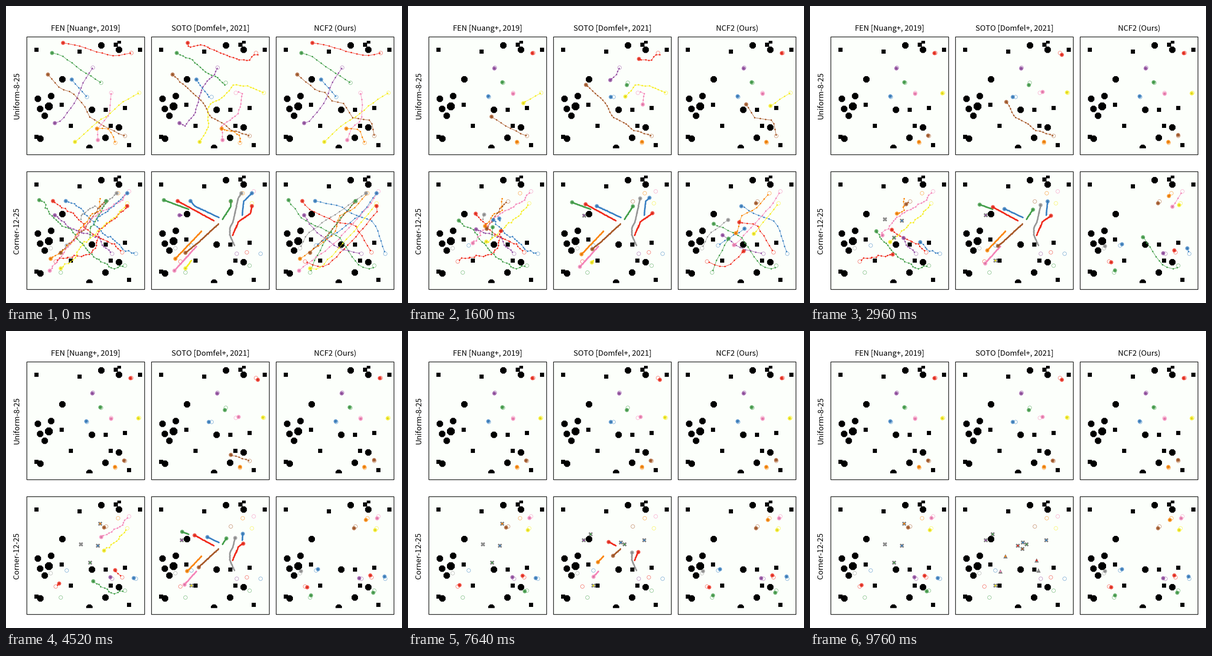
A matplotlib script that plays this animation: 864 by 648 pixels, repeating every 9.92 s.

```python
import math

import matplotlib.pyplot as plt
import numpy as np
from matplotlib.animation import FuncAnimation
from matplotlib.collections import LineCollection, PolyCollection
from matplotlib.colors import to_rgba
from matplotlib.patches import Rectangle

W, H = 864, 648
TICK, FRAMES = 40, 248
STEP_MS, STEPS = 97.55, 100
COL_DX, ROW_DY, SIDE = 272, 294, 257

COLORS = dict(red="#f02c1e", green="#45a04c", blue="#3c82c4", purple="#9650a4",
              orange="#fb8506", yellow="#f7ee22", brown="#a85a2a", pink="#f584b8",
              gray="#989898")
GRAY = to_rgba("#808080")

# Start and goal of each agent; a trailing 2 marks the second one of a colour.
UNIFORM = dict(
    red=((124, 80), (273, 102)), green=((100, 102), (207, 167)),
    brown=((91, 149), (259, 283)), blue=((143, 160), (176, 198)),
    purple=((106, 255), (189, 134)), pink=((200, 292), (229, 189)),
    orange=((198, 267), (238, 298)), yellow=((150, 296), (290, 189)))
CORNER = dict(
    green=((72, 423), (259, 566)), red=((102, 425), (253, 537)),
    blue=((130, 425), (283, 540)), purple=((106, 456), (231, 540)),
    gray=((241, 408), (97, 528)), blue2=((264, 408), (132, 522)),
    green2=((218, 425), (119, 581)), red2=((264, 436), (108, 557)),
    orange=((97, 551), (244, 408)), brown=((119, 538), (218, 426)),
    pink=((95, 577), (268, 404)), yellow=((119, 572), (264, 430)))

rng = np.random.default_rng(4)
agents, goal_pts, goal_colors = [], [], []


class Agent:
    """Walks along key points; a key with a third value is reached at that step."""

    def __init__(self, color, keys, pace, gap, jitter, dx):
        self.color = to_rgba(color)
        xy = np.array([p[:2] for p in keys], float) + (dx, 0)
        dist = np.r_[0, np.cumsum(np.hypot(*np.diff(xy, axis=0).T))]
        pins = [(0, 0)] + [(p[2], d) for p, d in zip(keys, dist) if len(p) == 3]
        if pins[-1][1] < dist[-1]:
            step, d = pins[-1]
            pins.append((step + (dist[-1] - d) / pace, dist[-1]))
        self.arrival = math.ceil(pins[-1][0])
        self.travel = np.interp(np.arange(STEPS + 1), *zip(*pins))
        count = max(2, round(dist[-1] / gap) + 1)
        self.s = np.linspace(0, dist[-1], count)
        self.nodes = np.c_[np.interp(self.s, dist, xy[:, 0]), np.interp(self.s, dist, xy[:, 1])]
        self.nodes[1:-1] += rng.normal(0, jitter, (count - 2, 2))
        self.end = "disc"

    def pose(self, k):
        here = [np.interp(self.travel[k], self.s, axis) for axis in self.nodes.T]
        return here, self.nodes[self.s > self.travel[k] + 1e-6]


def short_of(goal, before, gap):
    way = np.subtract(goal, before[:2])
    return tuple(goal - way * gap / np.hypot(*way))


def panel(scene, col, pace, gap, jitter, short, via, stops=None):
    stops = stops or {}
    for name, (start, goal) in scene.items():
        color = COLORS[name.rstrip("2")]
        keys = [start, *via.get(name, ())]
        stop = stops.get(name) or short_of(goal, keys[-1], short)
        agent = Agent(color, keys + [stop], pace, gap, jitter, col * COL_DX)
        if math.dist(stop[:2], goal) > 20:
            agent.end = "triangle" if agent.arrival >= STEPS else "cross"
        agents.append(agent)
        goal_pts.append((goal[0] + col * COL_DX, goal[1]))
        goal_colors.append(to_rgba(color, 0.85))


direct = dict(
    red=[(158, 86), (197, 99), (241, 109)],
    green=[(117, 106), (171, 144)],
    brown=[(118, 180), (145, 189), (172, 218), (181, 241, 16), (225, 268)],
    purple=[(118, 251), (152, 209), (166, 169)],
    pink=[(198, 270), (225, 236)],
    orange=[(226, 268)],
    yellow=[(192, 258), (222, 238), (251, 211, 16)])
panel(UNIFORM, 0, 10.5, 12.5, 0.5, 2, direct)

panel(UNIFORM, 1, 10, 7.5, 0.7, 2, dict(
    red=[(125, 90), (155, 84), (188, 99), (231, 115, 16), (259, 119), (266, 107)],
    green=[(133, 118), (173, 150), (185, 152)],
    brown=[(115, 172, 16), (156, 208, 30), (172, 240), (210, 262), (218, 270, 46)],
    purple=[(118, 262), (140, 233), (155, 180), (168, 161, 16), (183, 149)],
    pink=[(198, 260), (233, 236), (240, 214, 16), (243, 192)],
    orange=[(225, 275), (239, 283)],
    yellow=[(168, 270), (169, 216), (203, 197, 16), (225, 171), (262, 176)]),
    dict(red=(277, 106), green=(205, 172), blue=(170, 198), pink=(235, 187)))

panel(UNIFORM, 2, 10.5, 12.5, 0.5, 2, {
    **direct,
    "brown": [(134, 185), (150, 186), (165, 206), (194, 213, 16), (211, 243), (253, 249)],
    "pink": [(210, 263), (231, 250), (233, 215)],
    "yellow": [(187, 260), (227, 236), (246, 217, 16)]})

panel(CORNER, 0, 4.5, 6.5, 1.1, 5, dict(
    green=[(88, 429), (85, 440), (110, 468, 16), (143, 491, 30), (168, 520), (190, 546, 46), (235, 573)],
    red=[(118, 437), (147, 452, 16), (178, 491, 30), (238, 522, 46)],
    blue=[(152, 432), (187, 467, 16), (215, 500), (242, 513, 30), (253, 531)],
    purple=[(147, 488, 16), (206, 505, 30), (209, 520)],
    gray=[(207, 440), (192, 436), (165, 454, 16)],
    blue2=[(225, 445), (198, 463, 16)],
    green2=[(208, 450), (185, 482, 16)],
    red2=[(238, 462), (201, 489, 16), (198, 525), (180, 542, 30), (116, 551, 46)],
    orange=[(140, 520), (167, 479, 16), (189, 452, 30), (206, 446)],
    brown=[(172, 484, 16), (208, 431, 30)],
    pink=[(141, 518, 16), (157, 500, 30), (188, 460), (208, 448, 46), (240, 432)],
    yellow=[(148, 553), (169, 514, 16), (174, 514, 30), (214, 479, 46), (245, 455)]),
    dict(gray=(163, 465, 19), blue2=(200, 468, 18), green2=(183, 505, 26), orange=(205, 420, 39)))

panel(CORNER, 1, 1, 1.2, 0.3, 5, dict(
    blue=[(139, 436, 16)],
    gray=[(234, 419, 16), (223, 470, 64), (216, 483, 78), (216, 500)],
    blue2=[(246, 426, 30)],
    green2=[(218, 437, 16)],
    red2=[(261, 452, 16), (235, 470, 64)],
    brown=[(148, 515, 46)]),
    dict(green=(126, 443, 63), red=(181, 468, 97), blue=(192, 461, 74), purple=(111, 456, 8),
         gray=(226, 522, 100), blue2=(243, 456, 60), green2=(200, 465, 72), red2=(222, 500, 100),
         orange=(154, 491, 100), brown=(191, 475, 97), pink=(143, 524, 100), yellow=(132, 555, 22)))

panel(CORNER, 2, 8, 12, 0.7, 5, dict(
    green=[(98, 461), (122, 474, 16), (183, 503, 30), (218, 558), (231, 570), (255, 574)],
    red=[(111, 440), (178, 472, 16), (216, 477)],
    blue=[(183, 436, 16), (221, 458), (258, 470), (279, 528, 30)],
    purple=[(124, 485), (141, 500, 16), (186, 530)],
    gray=[(155, 467, 16), (112, 497)],
    blue2=[(226, 458), (189, 486, 16)],
    green2=[(184, 465), (154, 507, 16), (134, 545)],
    red2=[(267, 445), (231, 490), (188, 535, 16), (156, 566), (136, 567)],
    orange=[(134, 525), (172, 496, 16), (184, 456), (213, 443)],
    brown=[(156, 500), (194, 455, 11)],
    pink=[(136, 545), (168, 522, 16), (246, 437, 30)],
    yellow=[(136, 575), (171, 540), (210, 496, 16)]))


def box(x, y, w=9, h=9):
    return np.array([(x + i * w / 2, y + j * h / 2) for i, j in [(-1, -1), (1, -1), (1, 1), (-1, 1)]])


def octagon(x, y, r=7.0):
    turn = np.pi / 8 + np.arange(8) * np.pi / 4
    return np.c_[x + r * np.cos(turn) * 1.08, y + r * np.sin(turn) * 1.08]


BOXES = [(66, 95), (159.5, 98.5), (239, 84), (292, 95), (121, 215), (259, 222),
         (216.5, 226), (141, 261), (228, 261), (268, 303), (66, 285)]
BLOBS = [(207.5, 85.5), (246, 95), (122.5, 159.5), (98, 196), (69, 202), (74, 224),
         (84, 239), (187, 226), (246, 264.5), (216.5, 287), (74.5, 289)]
cut_blob = np.minimum(octagon(181.5, 309), (W, 310))
obstacles = [box(*p) for p in BOXES] + [octagon(*p) for p in BLOBS]
obstacles += [box(246, 78, 8, 6), octagon(93, 218.5, 8.5), cut_blob]

plt.rcParams["font.family"] = "Noto Sans CJK JP"
fig = plt.figure(figsize=(W / 72, H / 72), dpi=72, facecolor="white")
ax = fig.add_axes([0, 0, 1, 1])
# Whole numbers fall on pixel centres.
ax.set(xlim=(-0.5, W - 0.5), ylim=(H - 0.5, -0.5))
ax.axis("off")

shapes = []
for row in range(2):
    for col in range(3):
        shift = np.array((col * COL_DX, row * ROW_DY))
        ax.add_patch(Rectangle(shift + (45, 67), SIDE, SIDE, fc="#fcfffb", ec="black", lw=1.3, snap=False))
        shapes += [s + shift for s in obstacles]
ax.add_collection(PolyCollection(shapes, facecolors="black", linewidths=0, zorder=2))

for x, y, title in [(173.5, 54, "FEN [Nuang+, 2019]"), (445.5, 53, "SOTO [Domfel+, 2021]"),
                    (717.5, 53, "NCF2 (Ours)")]:
    ax.text(x, y, title, size=16.6, ha="center", va="baseline")
for y, label in [(195.5, "Uniform-8-25"), (489.5, "Corner-12-25")]:
    ax.text(27.5, y, label, size=16.6, rotation=90, rotation_mode="anchor", ha="center", va="baseline")

ax.scatter(*np.array(goal_pts).T, s=64, facecolors="none", edgecolors=goal_colors, linewidths=0.7, zorder=3)


def markers(diameter, shape, z):
    return ax.scatter([], [], s=diameter ** 2, marker=shape, linewidths=0, zorder=z)


lines = LineCollection([], linewidths=0.9, zorder=4)
ax.add_collection(lines)
dots = markers(3.3, "o", 5)
ends = dict(disc=markers(8.8, "o", 6), cross=markers(9.5, "X", 6), triangle=markers(9.5, "^", 6))
cores = markers(3.8, "o", 7)


def place(artist, pts, colors):
    artist.set_offsets(np.array(pts, float).reshape(-1, 2))
    artist.set_facecolors(np.array(colors, float).reshape(-1, 4))


def step_at(frame):
    k = math.ceil((TICK * frame - 0.3) / STEP_MS) - 1
    return min(max(k, 0), STEPS)


def update(frame):
    k = step_at(frame)
    trails, trail_colors, dot_pts, dot_colors = [], [], [], []
    core_pts, core_colors = [], []
    marks = {kind: ([], []) for kind in ends}
    for agent in agents:
        here, ahead = agent.pose(k)
        if len(ahead):
            trails.append(np.vstack([here, ahead]))
            trail_colors.append(agent.color)
            dot_pts.extend(ahead)
            dot_colors += [agent.color] * len(ahead)
        kind = agent.end if k >= agent.arrival else "disc"
        marks[kind][0].append(here)
        marks[kind][1].append((*agent.color[:3], 0.8) if kind == "disc" else GRAY)
        shade = 0.86 if kind == "disc" else 1
        core_pts.append(here)
        core_colors.append((*(c * shade for c in agent.color[:3]), 1))
    lines.set_segments(trails)
    lines.set_color(trail_colors)
    place(dots, dot_pts, dot_colors)
    place(cores, core_pts, core_colors)
    for kind, artist in ends.items():
        place(artist, *marks[kind])
    return [lines, dots, cores, *ends.values()]


anim = FuncAnimation(fig, update, frames=FRAMES, interval=TICK, init_func=lambda: update(0),
                     repeat=True, repeat_delay=0, blit=False)
plt.show()
```
